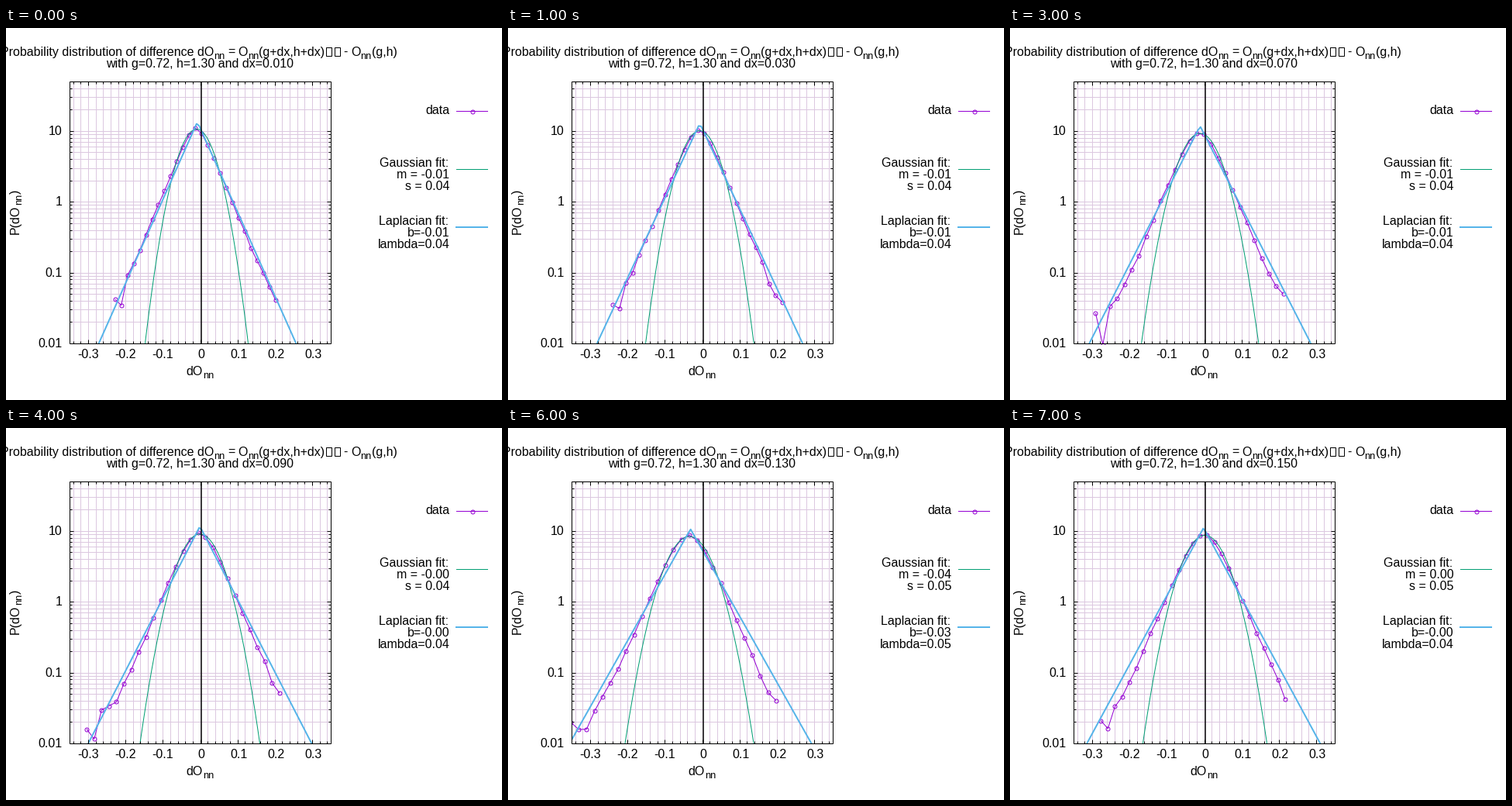
Recreate the animation shown at these times as a matplotlib script. Size 640 by 480 pixels, loop 8000 ms.

```python
import numpy as np
import matplotlib.pyplot as plt
from matplotlib.animation import FuncAnimation
from matplotlib.patches import Rectangle

plt.rcParams["font.family"] = "Liberation Sans"
W, H, DPI = 640, 480, 100
PT = 72 / DPI
LEFT, RIGHT, TOP, BOTTOM = 82.5, 419.5, 69.5, 407.5
UNIT = (RIGHT - LEFT) / 0.7
DECADE = (BOTTOM - TOP) / np.log10(5000)
PURPLE, GREEN, BLUE, GRID = "#9400d3", "#009e73", "#56b4e9", "#dcc8e0"

fig = plt.figure(figsize=(W / DPI, H / DPI), dpi=DPI, facecolor="white")
ax = fig.add_axes([0, 0, 1, 1])
ax.set_xlim(0, W)
ax.set_ylim(H, 0)
ax.axis("off")


def px(v):
    return LEFT + (v + 0.35) * UNIT


def py(p):
    return BOTTOM - (np.log10(np.maximum(p, 1e-12)) + 2) * DECADE


def pixel(c):
    return np.floor(c + 1e-6) + 0.5


def line(xs, ys, color, width=1.0, z=2, **kw):
    return ax.plot(xs, ys, color=color, lw=width * PT, zorder=z, snap=False,
                   solid_capstyle="butt", **kw)[0]


def box(x, y, w, h, z=2):
    return ax.add_patch(Rectangle((x, y), w, h, fill=False, ec="black",
                                  lw=PT, zorder=z, snap=False))


def text(x, y, s, size=16, ha="left", **kw):
    return ax.text(x, y, s, fontsize=size * PT, ha=ha, va="baseline", **kw)


# ---- grid, ticks and border ----
def x_tick(v, major):
    x, n = pixel(px(v)), 5 if major else 3
    line([x, x], [TOP, BOTTOM], GRID, z=1)
    line([x, x], [BOTTOM, BOTTOM - n], "black", z=5)
    line([x, x], [TOP, TOP + n], "black", z=5)


def y_tick(p, major):
    y, n = pixel(py(p)), 5 if major else 3
    line([LEFT, RIGHT], [y, y], GRID, z=1)
    line([LEFT, LEFT + n], [y, y], "black", z=5)
    line([RIGHT, RIGHT - n], [y, y], "black", z=5)


for i in range(-17, 18):
    x_tick(i * 0.02, i % 5 == 0)
for e in range(-2, 2):
    for k in range(1, 10):
        p = k * 10.0 ** e
        if 0.01 < p < 50:
            y_tick(p, k == 1)
for i in range(-3, 4):
    # non-negative labels carry a leading blank
    text(px(i / 10) + (1.2 if i >= 0 else -1), 426, f"{i / 10:g}", ha="center")
for p in (10, 1, 0.1, 0.01):
    text(72.7, py(p) + 4.5, f"{p:g}", ha="right")

frame = box(LEFT, TOP, RIGHT - LEFT, BOTTOM - TOP, z=6)
line([252, 252], [TOP, BOTTOM], "black", 1.5, z=5)

# ---- titles and axis names ----
text(-6.6, 36, "Probability distribution of difference dO")
text(268, 40, "nn", 12.8)
text(286.3, 36, "=")
text(299.6, 36, "O")
text(311.8, 40, "nn", 12.8)
text(326, 36, "(g+dx,h+dx)")
for x in (413.5, 424.5):
    box(x, 25.5, 7, 11)
text(435, 36, "-")
text(445, 36, "O")
text(457.4, 40, "nn", 12.8)
text(471.6, 36, "(g,h)")
title = text(249.7, 51, "", ha="center")

text(232.8, 448, "dO")
text(254, 452, "nn", 12.8)
for x, y, s, size in ((16.5, 266, "P(dO", 16), (20.5, 228.5, "nn", 12.8),
                      (16.5, 214, ")", 16)):
    text(x, y, s, size, rotation=90, rotation_mode="anchor")

# ---- legend ----
dots = dict(marker="o", ms=5 * PT, mfc="none", mew=PT)
text(572.5, 111, "data", ha="right")
line([581, 622], [107.5, 107.5], PURPLE)
line([601.5], [107.5], PURPLE, **dots)
text(571.5, 179, "Gaussian fit:", ha="right")
line([581, 622], [182.5, 182.5], GREEN)
text(571.5, 254, "Laplacian fit:", ha="right")
line([580, 622], [257, 257], BLUE, 2)
notes = [text(572.5, y, "", ha="right") for y in (194, 209, 269, 284)]

# ---- curves ----
data = line([], [], PURPLE, z=2, **dots)
gauss = line([], [], GREEN, z=3)
laplace = line([], [], BLUE, 2, z=4)
for c in (data, gauss, laplace):
    c.set_clip_path(frame)

# first bin, last bin, Gaussian m and s, Laplacian b and lambda
steps = [
    (-0.229, 0.201, -0.0104, 0.0370, -0.0083, 0.0367),
    (-0.240, 0.213, -0.0075, 0.0390, -0.0073, 0.0385),
    (-0.294, 0.201, -0.0318, 0.0493, -0.0335, 0.0482),
    (-0.292, 0.211, -0.0120, 0.0425, -0.0120, 0.0420),
    (-0.305, 0.212, -0.0016, 0.0435, -0.0016, 0.0424),
    (-0.326, 0.224, -0.0197, 0.0476, -0.0197, 0.0451),
    (-0.353, 0.197, -0.0353, 0.0470, -0.0322, 0.0465),
    (-0.278, 0.216, 0.0010, 0.0452, -0.0026, 0.0446),
]
v = np.linspace(-0.35, 0.35, 100)


def normal(x, m, s):
    return np.exp(-((x - m) / s) ** 2 / 2) / (s * np.sqrt(2 * np.pi))


def histogram(x, m, s, seed):
    """Round top, straight flanks on the log scale, sparse noisy tails."""
    width = 2.6 * s - 0.077
    drop = 13.2 * (np.hypot(x - m + 0.002, width) - width)
    p = 1.03 * normal(m, m, s) * 10 ** -drop / 10 ** (0.0 * drop)
    p = 1.03 * normal(m, m, s) * 10.0 ** -drop + 0.015
    p[1] *= 0.6
    noise = np.random.default_rng(seed).normal(size=len(x))
    return p * np.exp(0.02 * noise / np.sqrt(p))


def draw(i):
    first, last, m, s, b, lam = steps[i]
    title.set_text(f"with g=0.72, h=1.30 and dx={0.01 + 0.02 * i:.3f}")
    labels = (f"m = {m:.2f}", f"s = {s:.2f}", f"b={b:.2f}", f"lambda={lam:.2f}")
    for note, label in zip(notes, labels):
        note.set_text(label)
    bins = np.linspace(first, last, 27)
    data.set_data(px(bins), py(histogram(bins, m, s, i)))
    gauss.set_data(px(v), py(normal(v, m, s)))
    laplace.set_data(px(v), py(np.exp(-np.abs(v - b) / lam) / (2 * lam)))
    return [title, data, gauss, laplace, *notes]


anim = FuncAnimation(fig, draw, frames=len(steps), interval=1000,
                     init_func=lambda: draw(0), repeat=True, repeat_delay=0)
plt.show()
```
